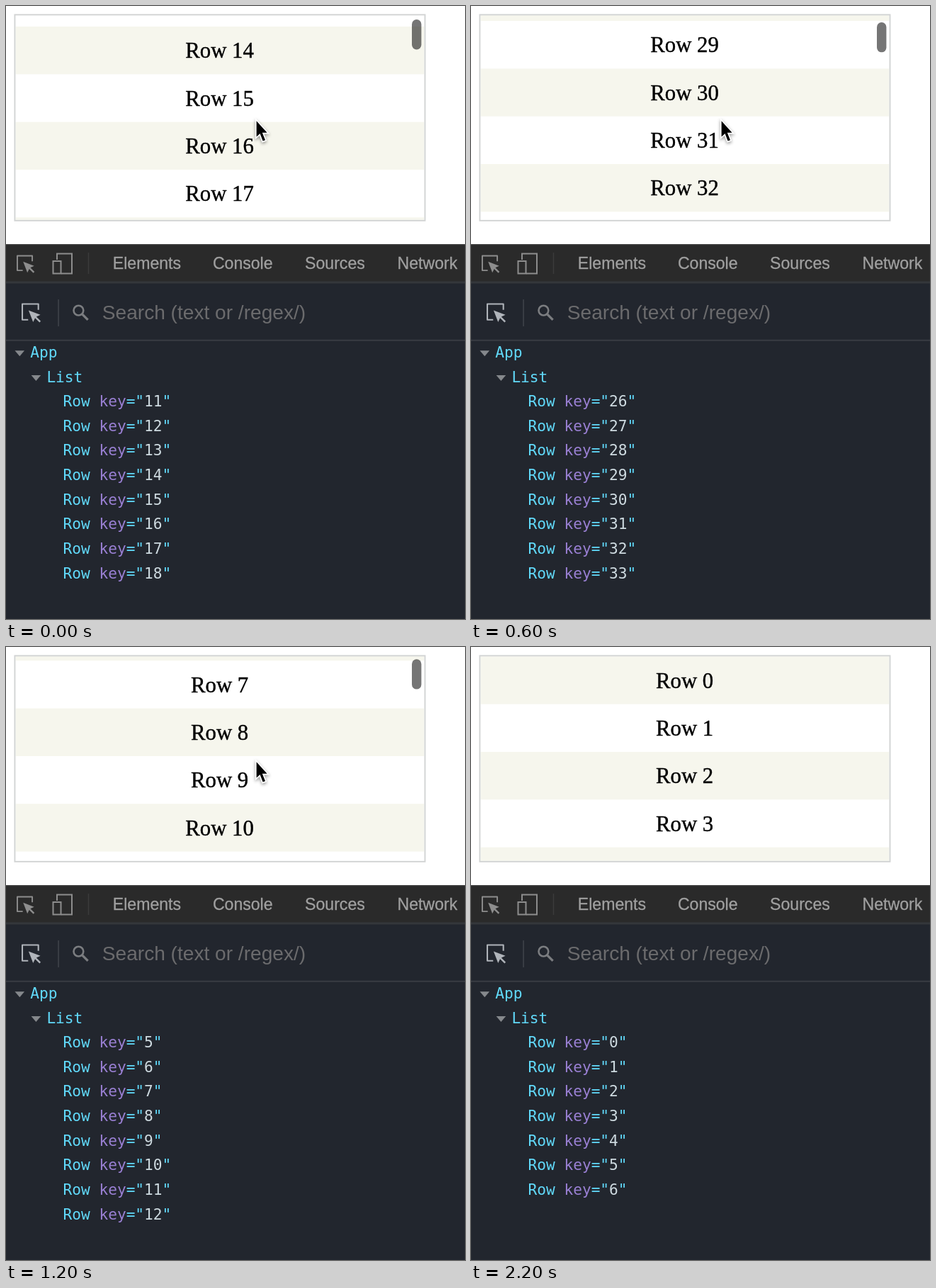
An HTML page with a canvas that plays this animation: 648 px wide and 865 px high, repeating every 2.4 s.

```html
<!DOCTYPE html>
<html lang="en">
<head>
<meta charset="utf-8">
<title>Windowed list</title>
<style>
  html, body { margin: 0; width: 100%; height: 100%; overflow: hidden; background: #fff; }
  canvas { display: block; }
</style>
</head>
<body>
<canvas id="stage" width="648" height="865"></canvas>
<script>
const ctx = document.getElementById('stage').getContext('2d');

const U = 1.9238;
const ROW_H = 35 * U;
const LIST = { x: 13.4, y: 13.3, w: 300 * U, h: 150 * U };
const STEP = 200, LOOP = 2400;

const SERIF = '"Liberation Serif", "Times New Roman", serif';
const SANS = '"Liberation Sans", Arial, sans-serif';
const MONO = '"DejaVu Sans Mono", monospace';
const CYAN = '#61dafb', PURPLE = '#9a80d4', VALUE = '#cedae0';

// scroll: offset in rows; key: first mounted row; painted: last row drawn so far
const top0 = { scroll: 0, key: 0, count: 7 };
const steps = [
  { scroll: 13.767, key: 11 },
  { scroll: 14.645, key: 13 },
  { scroll: 20.645, key: 17, painted: 21 },
  { scroll: 28.885, key: 26 },
  { scroll: 30.885, key: 29 },
  { scroll: 28.623, key: 29 },
  { scroll: 6.911, key: 5 },
  top0,
  top0,
  { ...top0, thumb: 0.5 },
  { ...top0, thumb: 0, pointer: false },
  { ...top0, thumb: 0, pointer: false }
];

function rect(x, y, w, h, color) {
  ctx.fillStyle = color;
  ctx.fillRect(x, y, w, h);
}

// weight thickens the glyphs a little, like font smoothing on a Mac
function text(str, x, y, font, color, weight = 0, align = 'left') {
  ctx.font = font;
  ctx.fillStyle = ctx.strokeStyle = color;
  ctx.textAlign = align;
  ctx.fillText(str, x, y);
  if (!weight) return;
  ctx.lineWidth = weight;
  ctx.lineJoin = 'round';
  ctx.strokeText(str, x, y);
}

function trace(points, close = true) {
  ctx.beginPath();
  points.forEach(([x, y]) => ctx.lineTo(x, y));
  if (close) ctx.closePath();
}

function fillShape(points, color) {
  trace(points);
  ctx.fillStyle = color;
  ctx.fill();
}

function drawRows({ scroll, painted = Infinity }) {
  ctx.save();
  ctx.beginPath();
  ctx.rect(LIST.x, LIST.y, LIST.w, LIST.h);
  ctx.clip();
  const last = Math.min(painted, Math.floor(scroll + LIST.h / ROW_H));
  for (let i = Math.floor(scroll); i <= last; i++) {
    const y = LIST.y + (i - scroll) * ROW_H;
    if (i % 2 === 0) rect(LIST.x, y, LIST.w, ROW_H, '#f6f6ed');
    text('Row ' + i, LIST.x + LIST.w / 2 - 0.4, y + ROW_H / 2 + 10.6, `${16 * U}px ${SERIF}`, '#000', 0.4, 'center');
  }
  ctx.restore();
}

function drawThumb(scroll, alpha) {
  if (!alpha) return;
  const y = 17.2 + U * Math.floor(scroll * 0.124);
  ctx.fillStyle = `rgba(0, 0, 0, ${0.54 * alpha})`;
  ctx.beginPath();
  ctx.roundRect(573, y, 13.4, 42.4, 6.7);
  ctx.fill();
}

function drawPointer() {
  const shape = [[353.6, 162.2], [353.6, 184.4], [358.6, 179.9], [362.6, 190.6],
    [366, 189.2], [361.8, 178.7], [368.6, 178.7]];
  ctx.save();
  ctx.lineJoin = 'miter';
  ctx.shadowColor = 'rgba(0, 0, 0, 0.4)';
  ctx.shadowBlur = 4;
  ctx.shadowOffsetY = 2;
  trace(shape);
  ctx.strokeStyle = '#fff';
  ctx.lineWidth = 3.4;
  ctx.stroke();
  ctx.restore();
  fillShape(shape, '#000');
}

function drawList(s) {
  rect(0, 0, 648, 337, '#fff');
  drawRows(s);
  ctx.strokeStyle = '#d2d4d4';
  ctx.lineWidth = U;
  ctx.lineJoin = 'miter';
  ctx.strokeRect(LIST.x - U / 2, LIST.y - U / 2, LIST.w + U, LIST.h + U);
  drawThumb(s.scroll, s.thumb ?? 1);
  if (s.pointer !== false) drawPointer();
}

function inspectIcon(x, y, k, color) {
  ctx.save();
  ctx.translate(x, y);
  ctx.scale(k, k);
  ctx.strokeStyle = color;
  ctx.lineWidth = 2;
  ctx.lineJoin = 'round';
  trace([[9, 22.5], [1, 22.5], [1, 1], [23, 1], [23, 9]], false);
  ctx.stroke();
  fillShape([[9.6, 9.6], [25.8, 15.8], [20.2, 18.5], [26.3, 24.6], [24.6, 26.3], [18.5, 20.2], [15.8, 25.8]], color);
  ctx.restore();
}

function deviceIcon() {
  ctx.strokeStyle = '#8d8d8d';
  ctx.lineWidth = 2;
  ctx.strokeRect(72, 349.5, 21, 28);
  rect(65, 358, 13, 21, '#2a2a2a');
  ctx.strokeRect(66.5, 360, 11, 17.5);
}

function searchIcon() {
  ctx.strokeStyle = '#7b7d80';
  ctx.lineWidth = 2.6;
  ctx.beginPath();
  ctx.arc(102.4, 429.6, 6.9, 0, 7);
  ctx.stroke();
  ctx.lineWidth = 3.2;
  trace([[107.6, 434.8], [115.6, 442.8]], false);
  ctx.stroke();
}

function drawTools() {
  rect(0, 336, 648, 53, '#2a2a2a');
  rect(0, 336, 648, 1.5, '#3a3a3a');
  inspectIcon(15, 351.5, 0.96, '#8d8d8d');
  deviceIcon();
  rect(115.7, 348, 1.6, 30, '#3b3b3b');
  const tabs = [['Elements', 150.8], ['Console', 291.9], ['Sources', 422.1], ['Network', 552.6]];
  for (const [name, x] of tabs) text(name, x, 371.4, `${12 * U}px ${SANS}`, '#a0a0a0', 0.3);

  rect(0, 389, 648, 476, '#22262e');
  rect(0, 388.5, 648, 3, '#34373b');
  inspectIcon(22, 419.5, 1.03, '#b0b4ba');
  rect(73.2, 414, 1.8, 38, '#3b3f46');
  searchIcon();
  text('Search (text or /regex/)', 135.8, 442.3, `28.1px ${SANS}`, '#6b6b6d');
  rect(0, 470.8, 648, 1.9, '#3a3d43');
}

function arrow(x, y) {
  fillShape([[x - 6.8, y - 4], [x + 6.8, y - 4], [x, y + 4]], '#85888c');
}

function drawTree({ key, count = 8 }) {
  const font = `${11 * U}px ${MONO}`;
  const lineY = n => 495.9 + n * 18 * U;
  const indent = n => 34.3 + n * 12 * U;
  arrow(19.3, 490.3);
  text('App', indent(0), lineY(0), font, CYAN);
  arrow(42.4, 524.9);
  text('List', indent(1), lineY(1), font, CYAN);
  for (let i = 0; i < count; i++) {
    const parts = [['Row ', CYAN], ['key', PURPLE], ['="', CYAN], [String(key + i), VALUE], ['"', CYAN]];
    let x = indent(2);
    for (const [str, color] of parts) {
      text(str, x, lineY(i + 2), font, color);
      x += ctx.measureText(str).width;
    }
  }
}

function frame(now) {
  const s = steps[Math.floor((now % LOOP) / STEP)];
  drawList(s);
  drawTools();
  drawTree(s);
}

let start;
function tick(now) {
  start ??= now;
  frame(Math.max(0, now - start));
  requestAnimationFrame(tick);
}
frame(0);
requestAnimationFrame(tick);
</script>
</body>
</html>
```
